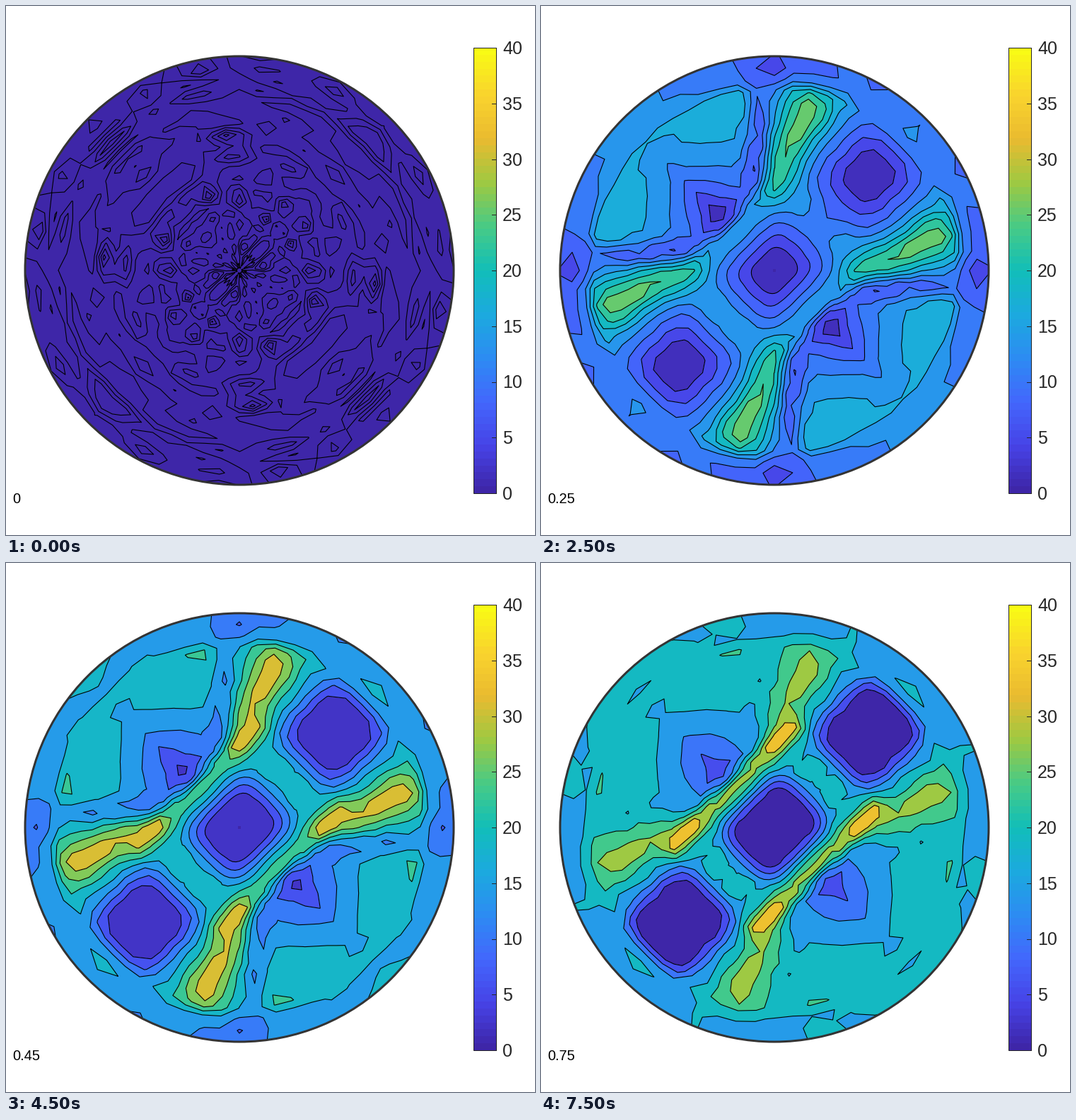
Write a matplotlib script that moves like this. It is 748 by 748 pixels and loops after 8 s.

```python
import numpy as np
import matplotlib.pyplot as plt
from matplotlib.animation import FuncAnimation
from matplotlib.colors import LinearSegmentedColormap
from matplotlib.patches import Circle, Rectangle

SIZE, DPI = 748, 100
PX = 72 / DPI
CX, CY, R = 330, 374, 303
FRAMES, STEP_MS = 16, 500
RINGS, SPOKES = 20, 64
INK = "#262626"

plt.rcParams["font.family"] = "Liberation Sans"
CMAP = LinearSegmentedColormap.from_list("heat", [
    "#3e26a8", "#4743e7", "#4367fd", "#2d8cf3", "#1caadf", "#12beb9",
    "#48cb86", "#9fc942", "#eabb30", "#fad42e", "#f9fb15"], N=64)

# Polar mesh; u runs to the upper right, v to the lower right
radius = np.linspace(3, R, RINGS)[:, None]
theta = np.arange(SPOKES) * 2 * np.pi / SPOKES
U = radius * np.cos(theta - np.pi / 4)
V = -radius * np.sin(theta - np.pi / 4)
A, B = abs(U), abs(V)


def wrap(z):
    return np.hstack([z, z[:, :1]])


X = wrap(CX + (U + V) / np.sqrt(2))
Y = wrap(CY + (V - U) / np.sqrt(2))


def box(a0, half_a, half_b):
    """Distance from (a0, 0) in a rounded-box norm."""
    return (((A - a0) / half_a)**4 + (B / half_b)**4)**.25


def bar(a0, b0, a1, b1, width):
    """Soft ridge along a segment, repeated in all four quadrants."""
    da, db = a1 - a0, b1 - b0
    s = np.clip(((A - a0) * da + (B - b0) * db) / (da**2 + db**2), 0, 1)
    d2 = (A - a0 - s * da)**2 + (B - b0 - s * db)**2
    return np.exp(-d2 / width**2)


PITS = np.minimum(box(0, 70, 58), box(190, 71, 68))
WING = bar(90, 92, 200, 128, 25)
CREST = bar(0, 82, 120, 82, 15)
VALLEY = bar(75, 117, 195, 210, 17)
BRIDGE = np.exp(-((U - 108) / 36)**2 - (V / 28)**2)
FAN_SIDE = np.clip((B - 88) / 14, 0, 1)
CORNER = B - 100 + 1.25 * A
RIM = np.clip((radius - 250) / 30, 0, 1) * (.2 + 1.6 * A * B / radius**2)

# Grain mirrored over both diagonals
rng = np.random.default_rng(7)
fold = (np.arange(SPOKES) - 8) % 32
fold = np.minimum(fold, 32 - fold)
GRAIN = rng.exponential(1, (RINGS, 17))[:, fold]
GRAIN = GRAIN / 2 + (np.roll(GRAIN, 1, 1) + np.roll(GRAIN, -1, 1)) / 4


def field(t):
    rise = min(t / .15, 1)
    if t < .35:
        stage = max((t - .15) / .2, 0)
    else:
        stage = 2 - (1 - (t - .35) / .4)**1.6

    def key(early, middle, late):
        return np.interp(stage, [0, 1, 2], [early, middle, late])

    inner, outer = key(0, .4, .65), key(1.3, 1.15, 1.1)
    pit = np.clip((PITS - inner) / (outer - inner), 0, 1)
    strip = key(10, 20, 19) * (.1 + .9 * pit)
    reach = np.maximum(CORNER + key(-15, 5, 15), 8) / key(70, 140, 125)
    fan = key(14, 27, 26) * (1 - np.exp(-reach))
    z = strip + (fan - strip) * FAN_SIDE
    z = z + key(4, 14, 8) * WING + key(0, 2, 12) * CREST
    z = z * (1 - key(.6, .5, .12) * VALLEY)
    z = z * (1 - key(.55, .55, .3) * RIM)
    z = z * (1 - key(.55, 0, 0) * BRIDGE)
    z = z + key(.6, 1.3, 1.8) * (GRAIN - 1) * radius / R
    return wrap(np.maximum(z * rise, .2))


def bands(t):
    gap = 4.65 * np.tanh((t / .33)**1.1)
    low = np.interp(t, [0, .15, .45, .55], [0, 1.6, 2, .5])
    return low + gap * np.arange(10)


fig = plt.figure(figsize=(SIZE / DPI, SIZE / DPI), dpi=DPI, facecolor="white")
ax = fig.add_axes([0, 0, 1, 1])


def frame_axes():
    ax.set(xlim=(0, SIZE), ylim=(SIZE, 0))
    ax.axis("off")


ax.add_patch(Circle((CX, CY), R, fc=CMAP(0), ec="none", zorder=1))
ax.add_patch(Circle((CX, CY), R, fc="none", ec="#333333", lw=3 * PX, zorder=5))

# Colour bar
LEFT, RIGHT, TOP, BOTTOM = 661, 693, 59, 689
ax.imshow(np.arange(64)[::-1, None], cmap=CMAP, aspect="auto",
          interpolation="nearest", extent=(LEFT, RIGHT, BOTTOM, TOP))
ax.add_patch(Rectangle((LEFT, TOP), RIGHT - LEFT, BOTTOM - TOP,
                       fc="none", ec=INK, lw=PX, zorder=5))
for value in range(0, 41, 5):
    y = BOTTOM - (BOTTOM - TOP) * value / 40
    ax.plot([RIGHT - 6, RIGHT], [y, y], color=INK, lw=PX, zorder=5)
    ax.text(702, y + 9, str(value), fontsize=25 * PX, color=INK)

clock = ax.text(9, 703, "0", fontsize=20 * PX, color="black")
frame_axes()
drawn = []


def draw(i):
    while drawn:
        drawn.pop().remove()
    t = i * STEP_MS / 10000
    clock.set_text(f"{t:g}")
    if i == 0:
        z = wrap(GRAIN)
        lines = np.linspace(0, GRAIN.max(), 7)[1:-1]
    else:
        z, levels = field(t), bands(t)
        lines = levels[1:]
        drawn.append(ax.contourf(X, Y, z, levels=lines, extend="both",
                                 colors=[CMAP(v / 40) for v in levels],
                                 antialiased=False, zorder=2))
    lines = lines[(lines > z.min()) & (lines < z.max())]
    drawn.append(ax.contour(X, Y, z, levels=lines, colors="black",
                            linewidths=1.1 * PX, zorder=3))
    frame_axes()
    return [clock]


anim = FuncAnimation(fig, draw, frames=FRAMES, init_func=lambda: [clock],
                     interval=STEP_MS, repeat=True, repeat_delay=0, blit=False)
plt.show()
```
